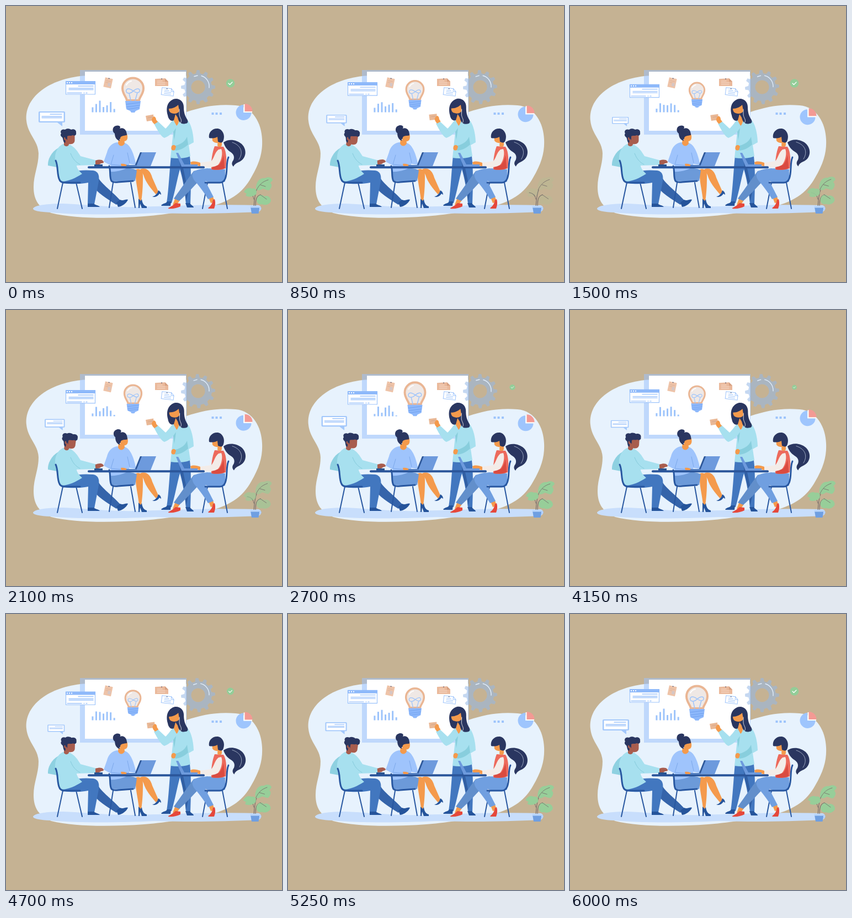
An HTML page for the animation above (6.1 s loop, 500 by 500 pixels).

```html
<!DOCTYPE html>
<html lang="en">
<head>
<meta charset="utf-8">
<title>Team meeting</title>
<style>
  html, body { margin: 0; width: 100%; height: 100%; overflow: hidden; background: #c5b293; }
  svg { display: block; width: 100%; height: 100%; }
  .line { fill: none; stroke-linecap: round; stroke-linejoin: round; }
  .chair { stroke: #2857a0; stroke-width: 2; }
  .back { stroke-width: 3; }
  .blue { stroke: #9dc4fb; }
  .navy { fill: #2a3660; }
  .skin { fill: #f49a4c; }
  .dark { fill: #a85d4e; }
  .aqua { fill: #a7e0ef; }
  .jeans { fill: #4277bf; }
  .shoe { fill: #25549b; }
</style>
</head>
<body>
<svg viewBox="0 0 500 500">
  <!-- backdrop -->
  <path fill="#e7f2fd" d="M140 126.500C110 129 82 139 64 153C42 170 35 190 37 208C40 234 58 243 59 267C59 290 50 305 50 328C50 352 60 366 82 375C125 386 195 385 250 381C300 377 322 371 356 366C405 357 429 338 444 311C460 284 465 264 464 242C463 213 448 183 416 180C382 177 354 183 327 192V126.500Z"/>
  <path fill="#c8defc" d="M49 367C51 361 75 358 104 358C150 360 190 365 240 364C310 362 380 359 458 361C464 363 464 372 456 373C390 376 340 377 270 375C210 378 130 379 80 374C62 373 49 371 49 367Z"/>

  <!-- board -->
  <path fill="#9ec4fb" fill-opacity=".55" d="M134 116H327V233H134Z"/>
  <path fill="#fff" d="M143 119H326V226H143Z"/>
  <g id="bars" fill="#9dc4fb"></g>
  <g transform="rotate(12 185 139)">
    <path fill="#eec3a8" d="M178 130.500H192V148H178Z"/>
    <path class="line" stroke="#dcb49c" d="M181 136H189M181 139H186"/>
    <path fill="#d5c6c4" d="M185 139H190V145H185Z"/>
    <circle cx="185" cy="131" r=".8" class="navy"/>
  </g>
  <path fill="#eab99b" d="M270 132L288 131L294 137V145H270Z"/>
  <path fill="#d69f80" d="M288 131V137H294Z"/>
  <path class="line" stroke="#f6ddcd" d="M274 136H283M274 139H288M274 142H288"/>
  <circle cx="282" cy="132" r=".8" class="navy"/>
  <g transform="rotate(7 293 155)">
    <path fill="#fff" stroke="#9dc4fb" d="M282 149H299L304 154V162H282Z"/>
    <path class="line blue" d="M299 149V154H304M287 153H295M287 156H299M287 159H299"/>
    <circle cx="291" cy="150" r=".8" class="navy"/>
  </g>
  <g id="bulb">
    <path fill="#efe8e5" stroke="#eab694" stroke-width="4" d="M219 171C218 164 211 160 211 149A19 18.500 0 0 1 249 149C249 160 242 164 241 171Z"/>
    <path class="line blue" stroke-width="1.500" d="M226 171L223 158C216 158 216 150 222 150C228 150 232 157 238 157C244 157 243 149 238 150C231 151 229 158 223 158M234 171L238 157"/>
    <path class="line" stroke="#fff" stroke-width="2" d="M218 143C220 139 223 137 227 136"/>
    <path fill="#8db8fb" d="M216 172H244L242 187L235 190L233 193H227L225 190L218 187Z"/>
    <path class="line" stroke="#6d9eec" stroke-width=".9" d="M218 178L242 175M218 183L242 180M220 187L241 184"/>
  </g>

  <!-- floating items -->
  <g id="gear" fill="#96b9e6" fill-opacity=".55">
    <path id="cog" fill-rule="evenodd"/>
    <path class="line" stroke="#e0edfb" stroke-width="1.400" d="M341 127.500L347 126M354 126.500C363 129 369 138 368 148"/>
  </g>
  <g id="page">
    <path fill="#fff" stroke="#9dc4fb" stroke-width="1.200" d="M108.500 137H161.500V160H108.500Z"/>
    <path fill="#8eb9fa" d="M108 136H162V142H108Z"/>
    <path fill="#fff" d="M110 138H112V140H110ZM114 138H116V140H114ZM118 138H120V140H118Z"/>
    <path class="line blue" stroke-width="1.400" d="M131 145H158M114 149H158M114 151.500H158M111 157.500H137M141 157.500H142M145 157.500H147"/>
  </g>
  <g id="bubble">
    <path fill="#a3c8fb" d="M61 191H105Q107 191 107 193V209Q107 211 105 211H102V218L93 211H61Q59 211 59 209V193Q59 191 61 191Z"/>
    <path fill="#fff" d="M61.500 193H104.500V208.700H61.500Z"/>
    <path class="line blue" stroke-width="1.400" d="M80 196H101M65 200H101M65 202.500H101"/>
  </g>
  <path fill="#9dc4fb" d="M372.500 193H376.500V197H372.500ZM379.500 193H383.500V197H379.500ZM387 193H391V197H387Z"/>
  <g id="pie">
    <path fill="#9ec5fd" d="M430 179A14 14 0 1 0 444.500 193H430Z"/>
    <path fill="#fff" d="M430.500 178H433V190.500H446V193H430.500Z"/>
    <path fill="#f39a94" d="M432.500 177A14 14 0 0 1 446.500 191H432.500Z"/>
  </g>
  <g id="check">
    <circle cx="406.500" cy="140" r="7.800" fill="#93cd98"/>
    <path class="line" stroke="#fff" stroke-width="1.300" d="M403 140L405.500 142.500L410 138"/>
  </g>

  <!-- plant -->
  <path class="line" stroke="#746a69" stroke-width="1.100" d="M449 364C450 352 450 344 454 333M452 364C452 352 453 344 461 342M449 350C448 343 443 339 437 338"/>
  <g id="plant">
    <g id="leaves" fill="#97ce99">
      <path d="M453 332C452 319 460 310 469 312C474 309 482 310 483 315C482 318 479 319 479 321C483 323 481 331 476 334C472 334 468 331 465 331C461 334 456 335 453 332Z"/>
      <path d="M431 337C434 330 441 328 446 331C452 329 456 335 453 341C448 346 437 347 434 343L436 340Z"/>
      <path d="M454 351C456 342 464 340 468 345C474 342 480 347 480 353C478 360 468 362 464 359C459 361 454 357 454 351Z"/>
    </g>
    <path class="line" stroke="#746a69" stroke-width=".8" d="M454 333C459 323 465 318 475 315M461 342L472 350M461 324L470 327"/>
  </g>
  <path class="line" stroke="#aacaf8" stroke-width="1.500" d="M459 365C463 364 463 369 458 370"/>
  <path fill="#6f9fe1" d="M443 364H459.500L457.500 376H445Z"/>
  <path fill="#b9d5fa" d="M442.500 362H460V365.500H442.500Z"/>

  <!-- man -->
  <path class="line chair" d="M103 320L93 367M127 320L138 367"/>
  <path fill="#3564aa" d="M140 304L164 305C169 320 191 334 207 352L200 360C184 350 164 338 154 322Z"/>
  <path class="shoe" d="M200 356L207 351C212 354 217 349 221 351C218 357 211 363 203 364Z"/>
  <path class="jeans" d="M96 310C112 299 136 296 158 298C169 300 170 310 167 323L160 359H148L149 320C132 323 104 324 96 317Z"/>
  <path class="shoe" d="M148 358H159C162 361 168 361 170 364H148Z"/>
  <path fill="#8ed1e1" d="M95 257C82 264 75 279 76 289L92 292L105 268Z"/>
  <path class="aqua" d="M103 250C93 255 88 266 89 278C90 292 95 303 97 317C108 320 124 313 138 304C131 298 128 292 128 289L163 288V279.500L135 272C130 264 125 255 113 250Z"/>
  <path class="line" stroke="#85cadb" d="M117 267C121 277 126 283 134 287"/>
  <g id="manHand"><path class="dark" d="M162 280C168 278 174 278 176 281C179 284 175 285 172 285C170 288 165 287 162 287Z"/></g>
  <g id="manHead">
    <path class="dark" d="M105 236L105 252C109 256 114 254 114 250C121 251 125 248 124.500 242V233L110 232Z"/>
    <path class="navy" d="M100 231C97 226 102 222 107 224C110 221.500 115 222 118 224C123 222 128 225 127 230C128 234 124 236 121 234C117 236 113 234 111 236L111 243L109 240C107 244 108 247 107 248C103 247 104 241 102 238C99 236 98 233 100 231Z"/>
    <path class="dark" d="M107 238C105 237 104 240 106 243L109 244Z"/>
  </g>
  <path class="line chair back" d="M90 280C95 290 92 306 97 315Q99 319 104 320H134"/>
  <path fill="#28538f" d="M160 287H175V291H160Z"/>

  <!-- seated woman, middle -->
  <path class="line chair" d="M194 320L187 365M226 320L234 365"/>
  <path class="skin" d="M243 296C254 291 262 299 265 311L276.500 337L271.500 341C263 331 253 320 249 306Z"/>
  <path class="shoe" d="M265 345C269 345 271 342 274 339L276 334C280 336 281 339 281 342L278 340C274 346 269 347 265 345Z"/>
  <path class="skin" d="M234 297C243 292 249 299 248 311C248 327 247 340 245 354H241C240 338 235 321 235 307Z"/>
  <path class="shoe" d="M240 349L244 353L246 350C247 358 250 362 255 363V366H246L243 358L242 366H240Z"/>
  <path fill="#6c9ad9" d="M188 297C206 292 228 292 237 298L234 317C219 319 202 318 190 317Z"/>
  <path fill="#9fc4fc" d="M201 247C192 248 185 256 183 265L177 282L190 289L188 300C203 301 215 296 224 291L223 286L236 288C233 275 228 252 215 248Z"/>
  <path class="line" stroke="#7ca8eb" d="M190 287L195 270M191 287L209 289M220 266L224 284"/>
  <path class="skin" d="M208 286C214 285 218 287 223 290H209ZM204 240L203 249C206 256 213 254 215 249L214 240Z"/>
  <g id="midHead">
    <path class="skin" d="M204 231H219C222 240 219 245 214 245C207 245 204 241 204 231Z"/>
    <path class="navy" d="M199 217C205 215 209 219 206 222C213 219 219 224 219 234C213 235 208 235 207 239L206 244C202 244 197 239 197 231C192 228 192 219 199 217Z"/>
    <circle cx="206" cy="242" r=".8" fill="#fff"/>
  </g>
  <path class="line chair back" d="M187 290C190 299 187 310 191 317Q194 320 203 319L230 317"/>

  <!-- standing woman -->
  <path class="jeans" d="M299 271L333 272C336 297 335 332 334 358H326C324 335 320 312 315 296C310 314 306 337 300 357H291C295 330 296 300 299 271Z"/>
  <path fill="#315fa3" d="M314 278L317 300C321 314 325 335 326 355L330 338C326 315 321 296 318 278Z"/>
  <path class="shoe" d="M281 361C285 357 290 358 292 354H299L298 362H282ZM325 357H333C335 361 340 362 340 365H328Z"/>
  <path class="aqua" d="M303 206C297 212 293 219 289 222L274 208L268 213C274 225 282 238 287 239C293 237 299 232 303 228L298 275C310 277 326 276 334 272L331 252L340 247C340 232 335 209 326 205Z"/>
  <path fill="#88cedd" d="M304 254C314 251 323 248 328 237L330 251C321 259 314 261 307 262ZM303 228L308 221L305 243Z"/>
  <path class="skin" d="M304 190V208L309 217C313 214 314 206 315 198ZM300 254C303 250 307 252 308 255L306 261C301 263 298 260 300 254Z"/>
  <g id="cardHand">
    <path fill="#e9b896" d="M253 199L267 196.500L268 207L255 209Z"/>
    <path fill="#d5a78b" d="M257 202L265 200.500L265.200 201.500L257.200 203Z"/>
    <path class="skin" d="M265 203C268 197 272 202 272 206L275 210L269 214C264 210 263 206 265 203Z"/>
  </g>
  <g id="standHead">
    <path class="navy" d="M304 168.500C314 166 322 173 322 183C322 192 324 199 328 205C331 210 329 213 325 213C318 215 313 211 311 202L307 196L304 207C299 210 294 205 293 198C290 188 290 174 304 168.500Z"/>
    <path class="skin" d="M295 186C302 186 308 183 312 179L314 190C312 195 305 196 300 194C297 193 295 190 295 186Z"/>
    <path class="line" stroke="#fff" stroke-width=".8" d="M314 187V197C315 204 320 206 316 212"/>
  </g>

  <!-- seated woman, right -->
  <path class="line chair" d="M365 320L356 367M392 320L401 367"/>
  <path class="skin" d="M307 347L315 352L308 362L302 360ZM367 347L375 345L378 355L371 357Z"/>
  <path fill="#e5483b" d="M294 366C300 363 304 360 307 357L316 358V363C310 366 302 368 294 367ZM366 366C372 362 374 357 375 351L378 350C380 356 379 362 377 367H367Z"/>
  <path fill="#628fcb" d="M366 294L340 299C331 311 318 329 304 349L314 353C329 340 342 324 354 313Z"/>
  <path fill="#709fe0" d="M397 296C378 294 356 293 344 298C334 302 337 312 344 319C352 329 360 339 366 350L376 346C371 336 365 325 361 317C374 322 388 322 397 318Z"/>
  <path fill="#ed6a5c" d="M378 254C374 264 371 280 372 296C382 298 391 297 398 294C400 282 400 264 394 255Z"/>
  <path fill="#da4b40" d="M374 290L386 288C391 282 393 275 394 270L396 294C388 297 380 297 373 296Z"/>
  <path fill="#f3ece8" d="M385 260C378 265 377 276 372 281L350 284V291C362 293 376 293 384 288C391 280 393 265 390 259Z"/>
  <path class="skin" d="M334 283C340 280 346 282 352 284V290C346 290 344 287 335 287ZM384 242L383 253C386 257 391 255 391 252V240Z"/>
  <g id="tail">
    <path class="navy" d="M394 247C403 240 418 242 427 250C438 261 435 278 421 283C416 285 413 288 412 291C408 287 409 283 412 279C415 272 411 267 406 264C400 260 396 254 394 247Z"/>
    <path class="line" stroke="#e7f2fd" stroke-width=".6" d="M410 247C425 252 431 265 422 278"/>
  </g>
  <path class="skin" d="M373 234H392V244C386 250 377 249 374 244Z"/>
  <path class="navy" d="M368 239C366 229 374 221 384 222C393 224 397 234 394 243C392 249 389 248 384 246L383 237C378 240 372 240 368 239Z"/>
  <path class="line chair back" d="M403 274C398 285 402 301 397 313Q394 320 387 320H361"/>

  <!-- table -->
  <path class="line" stroke="#2b569b" stroke-width="4" d="M150 292.300H358"/>
  <path fill="#6d9add" d="M244 265H272L262 290H234Z"/>
  <path fill="#2d5799" d="M243 265H246L236 290H233Z"/>
  <path fill="#547fc0" d="M218 288H237V291H218Z"/>
  <path fill="#6d9add" d="M308 266H312L323 287H347V291H318Z"/>
</svg>
<script>
const LOOP = 6100, MOTION = 6000, STEP = 50;
const el = id => document.getElementById(id);
const mix = (a, b, k) => a + (b - a) * k;
// 0 at the ends of each period, 1 halfway
const wave = (t, period) => (1 - Math.cos(2 * Math.PI * t / period)) / 2;

const scale = (id, x, y, k) =>
  el(id).setAttribute('transform', `translate(${x} ${y}) scale(${k}) translate(${-x} ${-y})`);
const turn = (id, x, y, a) => el(id).setAttribute('transform', `rotate(${a} ${x} ${y})`);
const drop = (id, y) => el(id).setAttribute('transform', `translate(0 ${y})`);

function cogPath(x, y, teeth) {
  const pts = [];
  const size = 360 / teeth;
  for (let i = 0; i < teeth; i++) {
    for (const [a, r] of [[-9, 25], [-4.5, 31], [4.5, 31], [9, 25]]) {
      const rad = (i * size + a) * Math.PI / 180;
      pts.push((x + r * Math.cos(rad)).toFixed(2) + ' ' + (y + r * Math.sin(rad)).toFixed(2));
    }
  }
  return `M${pts.join('L')}ZM${x - 12.5} ${y}a12.5 12.5 0 1 0 25 0a12.5 12.5 0 1 0 -25 0Z`;
}
el('cog').setAttribute('d', cogPath(348, 147, 12));

const BASE = 192.5;
const heights = [[9, 4], [15, 17.5], [21, 6], [9.5, 16], [12.5, 19.5], [18.5, 8], [6, 1.5]];
const bars = heights.map((h, i) => {
  const bar = document.createElementNS('http://www.w3.org/2000/svg', 'rect');
  bar.setAttribute('x', 155.4 + i * 6.55);
  bar.setAttribute('width', 3);
  el('bars').append(bar);
  return bar;
});

const leafFade = [[0, 1], [450, 1], [850, .14], [1300, .9], [1700, .9], [2100, .6], [2600, 1], [MOTION, 1]];
function track(steps, t) {
  const i = Math.max(1, steps.findIndex(s => s[0] >= t));
  const [t0, a] = steps[i - 1], [t1, b] = steps[i];
  return mix(a, b, (t - t0) / (t1 - t0));
}

function draw(t) {
  const slow = wave(t, 6000), mid = wave(t, 3000), quick = wave(t, 1500);

  bars.forEach((bar, i) => {
    const h = mix(...heights[i], slow);
    bar.setAttribute('y', BASE - h);
    bar.setAttribute('height', h);
  });
  drop('page', 11.3 * slow);
  drop('pie', t < 5000 ? 12.5 * wave(t, 5000) : 0);

  scale('bulb', 230, 161, 1 - .28 * mid);
  scale('bubble', 105, 218, 1 - .37 * mid);
  scale('check', 406.5, 140, 1 - quick);

  turn('gear', 348, 147, -4 * mid);
  turn('plant', 451, 364, -2.5 * mid);
  el('leaves').setAttribute('opacity', track(leafFade, t));

  turn('manHead', 110, 253, 8 * quick);
  turn('midHead', 209, 250, 3.5 * quick);
  turn('standHead', 312, 208, 2 * quick);
  turn('tail', 395, 248, -2 * mid);
  turn('cardHand', 287, 234, 4 * wave(t, 2000));
  turn('manHand', 162, 284, -5 * quick);
}

function frame() {
  const t = performance.now() % LOOP;
  draw(Math.min(Math.floor(t / STEP) * STEP, MOTION));
  requestAnimationFrame(frame);
}
frame();
</script>
</body>
</html>
```
